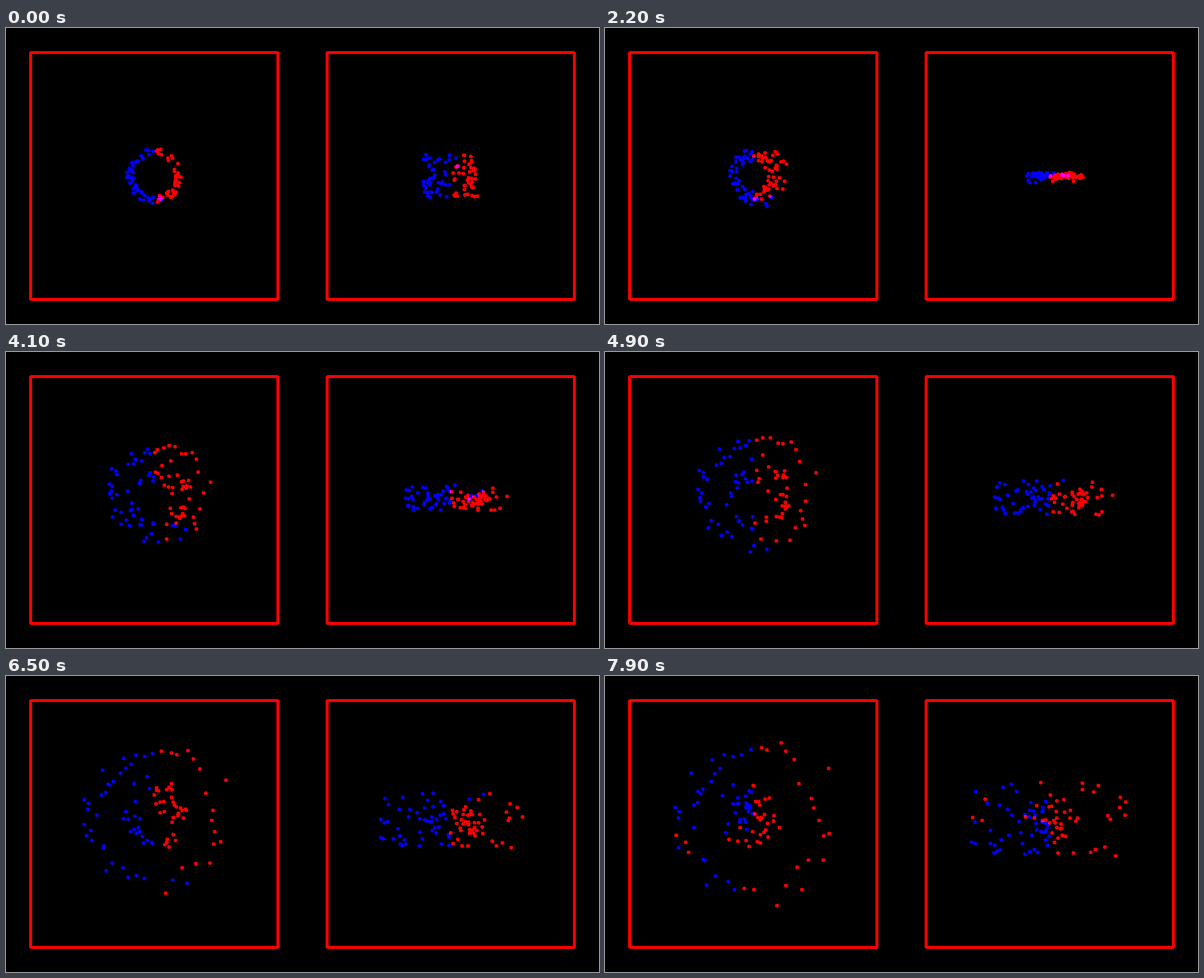
A matplotlib script for the animation above (8000 ms loop, 1000 by 500 pixels).

```python
import numpy as np
import matplotlib.pyplot as plt
from matplotlib.animation import FuncAnimation

W, H, FRAMES, STEP = 1000, 500, 80, 100
END = (FRAMES - 1) * STEP / 1000
N_HALO, N_CORE = 48, 52
COUNT = N_HALO + N_CORE
SPIN = 1500  # angular momentum, px^2 per second
RED, BLUE = 0, 2

# End offsets (x, y, z) of the farthest particles
EXTREMES = np.array([(127, -94, -15), (47, -137, -10),
                     (40, 138, 49), (-126, -10, -3)], float)

rng = np.random.default_rng(12)


def clumped_angles(n, centre, k):
    """Evenly drawn angles, pulled towards a centre given in degrees."""
    u = np.pi * (2 * (np.arange(n) + rng.uniform(0, 1, n)) / n - 1)
    return np.radians(centre) + u - k * np.sin(u)


def final_state():
    """Angle, radius and height of every particle at the end."""
    halo = clumped_angles(N_HALO, 150, 0.4)
    core = clumped_angles(N_CORE, 105, 0.7)
    phi = np.r_[halo, core]
    r = np.r_[rng.uniform(100, 138, N_HALO),
              rng.uniform(15, 75, N_CORE) * (0.75 + 0.25 * np.cos(core - np.radians(105)))]
    z = np.r_[rng.uniform(-72, 62, N_HALO), rng.normal(-6, 18, N_CORE)]

    # Each extreme takes the halo slot nearest to its own angle
    for ex, ey, ez in EXTREMES:
        angle = np.arctan2(-ey, ex)
        i = np.argmax(np.cos(halo - angle))
        phi[i], r[i], z[i] = angle, np.hypot(ex, ey), ez
    return phi, r, z


def build_paths():
    """Positions of every particle, shape (frames, particles, xyz)."""
    phi_end, r_end, z_end = final_state()
    r_start = rng.uniform(34, 47, COUNT)
    r_low = rng.uniform(23, 41, COUNT)
    r_low[:N_HALO] += 16 * np.clip(np.cos(phi_end[:N_HALO] - np.radians(50)), 0, 1)
    bend = 50 + 40 * np.cos(phi_end - np.radians(115))
    z_start = -np.sign(z_end) * rng.uniform(2, 36, COUNT)
    turn = rng.uniform(1.75, 2.25, COUNT)
    cross = rng.uniform(1.5, 2.9, COUNT)

    t = np.arange(FRAMES)[:, None] * STEP / 1000

    # Shrink to the smallest radius, then fly out while slowing down
    out = (t - turn) / (END - turn)
    r = np.where(t < turn,
                 r_start + (r_low - r_start) * (t / turn) ** 2,
                 r_low + (r_end - r_low) * out + bend * out * (1 - out))

    # Fall through the mid plane and leave on the other side
    z = np.where(t < cross,
                 z_start * (1 - (t / cross) ** 1.6),
                 z_end * (t - cross) / (END - cross))

    omega = SPIN / (r ** 2 + 300)
    swept = np.cumsum(omega, axis=0) * STEP / 1000
    phi = phi_end + swept - swept[-1]
    return np.stack([r * np.cos(phi), -r * np.sin(phi), z], axis=-1)


def first_half(p):
    """Split along a space-filling order into two equal halves."""
    x, y, z = p.T
    left, down, up_z = x < 0, y > 0, z < 0
    cell = np.select(
        [left & ~down, left & ~up_z, left, down & up_z],
        [0, 1, 2, 3], 4)
    order = np.lexsort((x - 1.5 * y, cell))
    mask = np.zeros(COUNT, bool)
    mask[order[:COUNT // 2]] = True
    return mask


def make_stage():
    img = np.zeros((H, W, 3), np.uint8)
    for x0 in (39, 539):
        x1 = x0 + 422
        img[39:461, x0:x1, RED] = 255
        img[44:456, x0 + 5:x1 - 5] = 0
        # Round the corners
        for row, cut in ((39, 2), (40, 1), (459, 1), (460, 2)):
            img[row, x0:x0 + cut] = 0
            img[row, x1 - cut:x1] = 0
    return img


DOT = np.full((6, 6), 255, np.uint8)
DOT[::5, ::5] = 0


def stamp(img, x, y, channel):
    col, row = int(round(x)) - 3, int(round(y)) - 3
    spot = img[row:row + 6, col:col + 6, channel]
    np.maximum(spot, DOT, out=spot)


PATHS = build_paths()
STAGE = make_stage()

fig = plt.figure(figsize=(W / 100, H / 100), dpi=100, facecolor="black")
ax = fig.add_axes([0, 0, 1, 1])
ax.axis("off")
view = ax.imshow(STAGE, interpolation="nearest", aspect="auto")


def draw(i):
    img = STAGE.copy()
    p = PATHS[i]
    for (x, y, z), is_blue in zip(p, first_half(p)):
        channel = BLUE if is_blue else RED
        stamp(img, 250 + x, 250 + y, channel)
        stamp(img, 750 + x, 250 + z, channel)
    view.set_data(img)
    return [view]


anim = FuncAnimation(fig, draw, frames=FRAMES, interval=STEP, repeat=True,
                     repeat_delay=0, blit=False)
plt.show()
```
